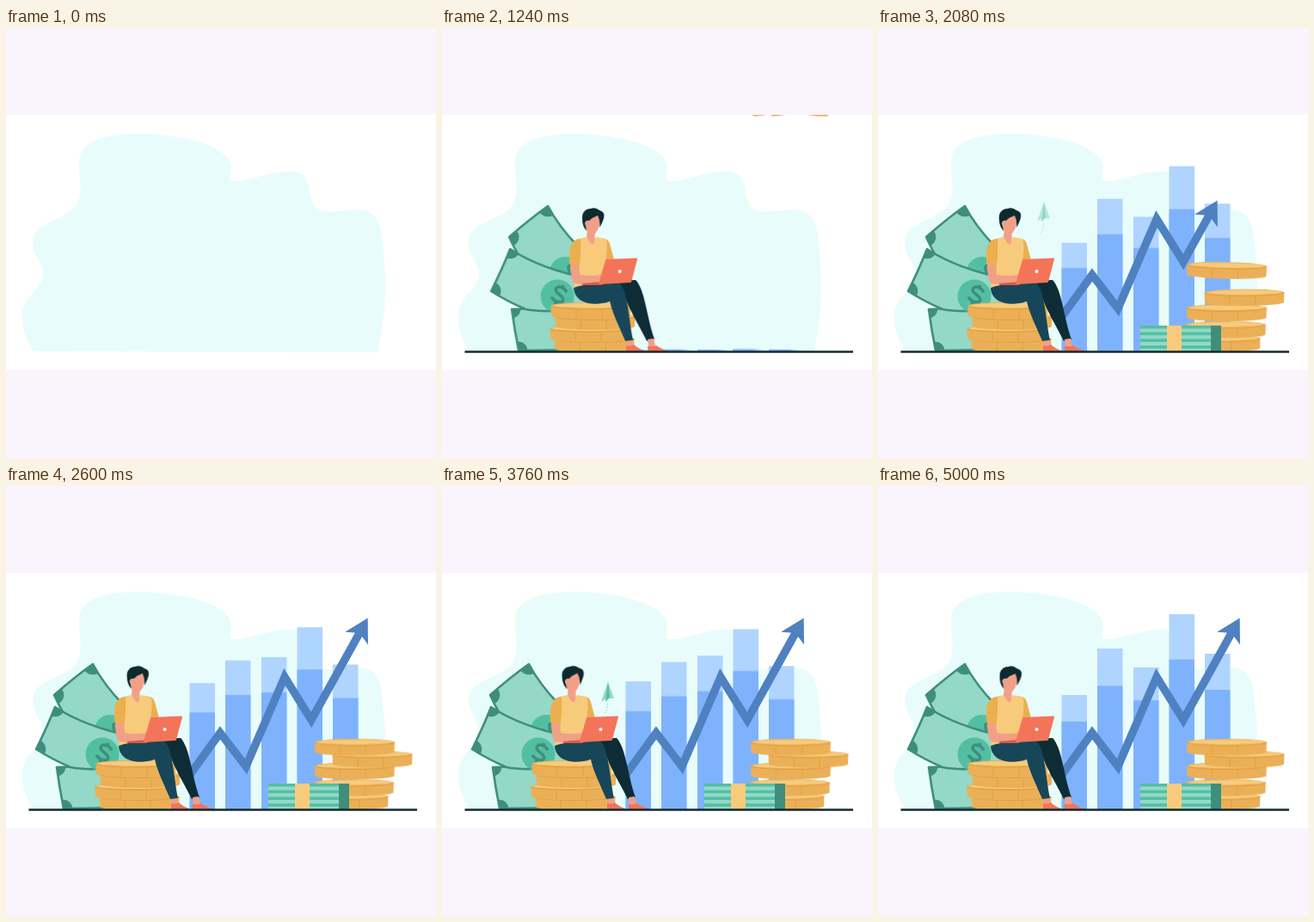
An HTML page for the animation above (5080 ms loop, 500 px wide and 500 px high).

```html
<!DOCTYPE html>
<html lang="en">
<head>
<meta charset="utf-8">
<title>Growing investment</title>
<style>
  html, body { margin: 0; width: 100%; height: 100%; overflow: hidden; background: #f9f4fe; }
  svg { display: block; width: 100%; height: 100%; }

  .anim { animation: 5080ms linear infinite both; }

  .ground { animation-name: ground; transform-origin: 252px 376px; }
  @keyframes ground {
    0%, .4% { transform: scaleX(0); animation-timing-function: cubic-bezier(.33,1,.68,1); }
    9.45%, 100% { transform: none; }
  }

  .rise { animation-name: rise; }
  @keyframes rise {
    0%, 3.15% { transform: translateY(174px); animation-timing-function: cubic-bezier(.5,1,.89,1); }
    21.26%, 100% { transform: none; }
  }
  .slide { animation-name: slide; }
  @keyframes slide {
    0%, 14.96% { transform: translateX(100px); animation-timing-function: cubic-bezier(.65,0,.35,1); }
    30.31%, 100% { transform: none; }
  }
  .head { animation-name: nod; transform-origin: 150px 246px; animation-timing-function: ease-in-out; }
  @keyframes nod {
    0%, 33.9% { transform: none; }
    51.2% { transform: rotate(-.6deg); }
    59.8% { transform: rotate(-2deg); }
    74% { transform: rotate(-3deg); }
    92%, 100% { transform: rotate(1.5deg); }
  }

  .bar { animation-name: bar; animation-timing-function: cubic-bezier(.37,0,.63,1); }
  @keyframes bar {
    0%, 22.83% { transform: scaleY(0); }
    44.09%, 45.67% { transform: scaleY(1); }
    60.63%, 65.04% { transform: scaleY(var(--to)); }
    80%, 100% { transform: scaleY(1); }
  }

  .trend { animation-name: show; }
  @keyframes show {
    0%, 25.2% { opacity: 0; }
    25.21%, 100% { opacity: 1; }
  }
  .line { stroke-dasharray: 1 2; animation-name: draw; }
  @keyframes draw {
    0%, 25.2% { stroke-dashoffset: 1; animation-timing-function: cubic-bezier(.37,0,.63,1); }
    45.96%, 100% { stroke-dashoffset: 0; }
  }
  .tip {
    offset-path: path("M212 338L249 287L279 326L324 222L355 272L411 171");
    offset-rotate: auto;
    animation-name: travel;
  }
  @keyframes travel {
    0%, 25.2% { offset-distance: 0%; animation-timing-function: cubic-bezier(.37,0,.63,1); }
    45.96%, 100% { offset-distance: 100%; }
  }

  /* the stack stays hidden while delayed coins still hold their landed pose */
  .stack { animation-name: stack; }
  @keyframes stack {
    0%, 24% { visibility: hidden; }
    24.01%, 100% { visibility: visible; }
  }
  .coin { animation-name: fall; animation-delay: calc(var(--i) * 110ms); }
  @keyframes fall {
    0%, 26.46% {
      transform: translateY(var(--drop)) rotate(var(--tilt));
      animation-timing-function: cubic-bezier(.33,1,.68,1);
    }
    37.28%, 100% { transform: none; }
  }

  .bundle { animation-name: pop; }
  @keyframes pop {
    0%, 29.92% { transform: scale(0); animation-timing-function: cubic-bezier(.33,1,.68,1); }
    39.76%, 100% { transform: none; }
  }

  .plane { animation-name: fly; }
  @keyframes fly {
    0%, 29.53% { transform: translateY(24px); opacity: 0; }
    31.9% { opacity: 1; }
    39.4% { opacity: 1; }
    43.31% { transform: translateY(-36px); opacity: 0; }
    43.32%, 68.5% { transform: translateY(24px); opacity: 0; }
    70.9% { opacity: 1; }
    78.4% { opacity: 1; }
    82.28%, 100% { transform: translateY(-36px); opacity: 0; }
  }
</style>
</head>
<body>
<svg viewBox="0 0 500 500">
  <defs>
    <clipPath id="band"><rect y="101" width="500" height="297"/></clipPath>
    <clipPath id="above"><rect y="101" width="500" height="275"/></clipPath>
    <clipPath id="billA"><path id="a" d="M101 207Q113 230 136 254L150 290L84 290Q66 266 56 243Q80 222 101 207Z"/></clipPath>
    <clipPath id="billB"><path id="b" d="M57 257Q92 280 150 292L150 325Q100 332 75 327Q52 317 35 306Q48 280 57 257Z"/></clipPath>
    <clipPath id="billC"><path id="c" d="M59 327Q90 326 140 323L140 374L67 375Q62 350 59 327Z"/></clipPath>
    <g id="coin">
      <path d="M-46.5-5.5A46.5 4 0 0 1 46.5-5.5L46 6A46 4 0 0 1-46 6Z" fill="#ebb057"/>
      <path d="M-46.5-5.5A46.5 4 0 0 0 46.5-5.5M-17-1.7V9.2M13-1.7V9.4" fill="none" stroke="#e09f3f"/>
      <ellipse cy="-5.8" rx="44" ry="2.7" fill="#f8cb7c"/>
    </g>
    <path id="dollar" d="M7-6C2-11-7-9-6-4C-5 1 6-1 7 4C7 9-3 10-7 6M0-8V-12M0 8V12" fill="none" stroke="#3f8e7c" stroke-width="3.4"/>
  </defs>

  <rect y="101" width="500" height="297" fill="#fff"/>
  <path fill="#e8fcfc" d="M32 376C22 360 18 346 19 334C21 308 43 305 43 286C43 272 30 264 31 248C33 222 74 225 84 202C90 186 84 172 85 155C87 128 122 123 155 123C190 123 262 133 262 163C261 170 259 176 262 178C275 181 312 164 337 167C361 173 346 204 366 212C382 217 404 209 417 212C432 216 436 230 437 243C443 290 443 330 432 377Z"/>

  <g id="bars" transform="translate(0 376)"></g>

  <g class="anim trend" fill="#4f81c0">
    <path class="anim line" pathLength="1" d="M212 338L249 287L279 326L324 222L355 272L411 171" fill="none" stroke="#4f81c0" stroke-width="9.4" stroke-miterlimit="8"/>
    <path class="anim tip" d="M20 0L-7 15.3L0 0L-7-15.3Z"/>
  </g>

  <g clip-path="url(#above)"><g class="anim slide"><g class="anim rise">
    <g fill="#94d8c7" stroke="#3f8e7c" stroke-width="2.6" stroke-linejoin="round">
      <use href="#c"/>
      <g clip-path="url(#billC)" fill="#3f8e7c"><circle cx="59" cy="327" r="9"/><circle cx="67" cy="375" r="9"/></g>
      <use href="#a"/>
      <g clip-path="url(#billA)" fill="#3f8e7c"><circle cx="101" cy="207" r="11"/><circle cx="56" cy="243" r="10"/></g>
      <circle cx="121" cy="284" r="18" fill="#52bfa3" stroke="none"/>
      <use href="#dollar" transform="translate(126 284) rotate(52)"/>
      <use href="#b"/>
      <g clip-path="url(#billB)" fill="#3f8e7c"><circle cx="57" cy="257" r="10"/><circle cx="35" cy="306" r="10"/></g>
      <circle cx="112" cy="312" r="19.5" fill="#52bfa3" stroke="none"/>
      <use href="#dollar" transform="translate(114 310) rotate(24)"/>
    </g>

    <use href="#coin" x="155" y="367"/>
    <use href="#coin" x="150" y="355"/>
    <use href="#coin" x="156" y="341"/>
    <use href="#coin" x="151" y="328.5"/>

    <path fill="#0d2c35" d="M182 294L203 293C214 304 216 338 225 362L216 364C207 346 195 327 188 306Z"/>
    <path fill="#f29f87" d="M217 362L224 361L226 371L218 372ZM192 363L199 363L200 371L193 371Z"/>
    <path fill="#f47459" d="M192 376L192 369Q197 371 201 368Q206 373 213 375V376ZM217 376L217 370Q223 371 227 369Q232 373 240 375V376Z"/>
    <path fill="#174658" d="M131 302C140 296 168 296 183 296C194 302 195 340 200 363L191 364C185 349 177 335 173 318C155 324 132 321 131 302Z"/>

    <path fill="#eab04f" d="M164 245Q171 244 173 251L178 270L168 272Z"/>
    <path fill="#f8cb7c" d="M133 246L146 243L152 252L157 243L168 245Q171 250 168 270L166 298Q146 297 131 302L134 277Z"/>
    <path fill="#f29f87" d="M127 273L137 272L138 287Q152 289 163 287L163 294Q145 300 132 297Q127 293 127 273Z"/>
    <path fill="#eab04f" d="M139 245Q127 246 126 261L126 275L138 276Q140 258 139 245Z"/>
    <path fill="#f29f87" d="M147 232L146 243Q150 251 153 252Q157 248 155 237Z"/>
    <g class="anim head">
      <path fill="#f29f87" d="M145 222Q151 213 162 219Q162 232 156 239Q152 242 148 238Q143 232 145 222Z"/>
      <path fill="#0e2a31" d="M146 236Q140 230 141 218Q143 210 151 210Q156 208 161 212Q169 214 165 224Q163 229 161 232Q162 224 159 218Q153 220 149 224Q145 223 144 227Q145 230 146 236Z"/>
    </g>
    <path fill="#d95a46" d="M141 297L164 295V299L141 299Z"/>
    <path fill="#f4745a" stroke="#f4745a" stroke-width="2" stroke-linejoin="round" d="M169 270L204 268.5L197 295L161 297Z"/>
    <circle cx="184.500" cy="283" r="2" fill="#fff"/>
  </g></g></g>

  <g class="anim plane">
    <path d="M192.500 253Q193 260 188 265" fill="none" stroke="#7fbfb2" stroke-width="1" stroke-dasharray="1.5 2"/>
    <path fill="#94d8c7" d="M193 228L185 251L191 247L200 247Z"/>
    <path fill="#52bfa3" d="M193 228L190 251L195 246Z"/>
  </g>

  <g clip-path="url(#band)"><g class="anim stack" id="stack"></g></g>

  <g transform="translate(352 376)"><g class="anim bundle">
    <path fill="#94d8c7" d="M-47-30H47V0H-47Z"/>
    <path stroke="#52bfa3" stroke-width="3.6" d="M-47-28.200H35M-47-20.500H35M-47-12.800H35M-47-5H35"/>
    <path fill="#f8cb7c" d="M-16-30H1V0H-16Z"/>
    <path fill="#3f8e7c" d="M35-30H47V0H35Z"/>
  </g></g>

  <path class="anim ground" d="M26.500 376.500H478" stroke="#12292f" stroke-width="2.6"/>
</svg>
<script>
  // [x, height, swing ratio]
  const bars = [
    [213.5, 133, 1.346], [255, 187, .754], [297, 165, 1.243],
    [338.5, 227, .775], [380, 181, .768]
  ];
  document.getElementById('bars').innerHTML = bars.map(([x, h, to]) =>
    `<g class="anim bar" style="--to:${to}">
      <rect x="${x}" y="${-h}" width="29.5" height="${h}" fill="#afd4ff"/>
      <rect x="${x}" y="${-h * .768}" width="29.5" height="${h * .768}" fill="#7fb2fd"/>
    </g>`).join('');

  // resting centres, bottom coin first
  const coins = [[398, 366.5], [404.5, 350.5], [405.5, 331], [426, 317.5], [405.5, 303.5]];
  document.getElementById('stack').innerHTML = coins.map(([x, y], i) =>
    `<g transform="translate(${x} ${y})">
      <g class="anim coin" style="--i:${i};--drop:${85 - y}px;--tilt:${i % 2 ? -14 : 14}deg">
        <use href="#coin"/>
      </g>
    </g>`).join('');
</script>
</body>
</html>
```
